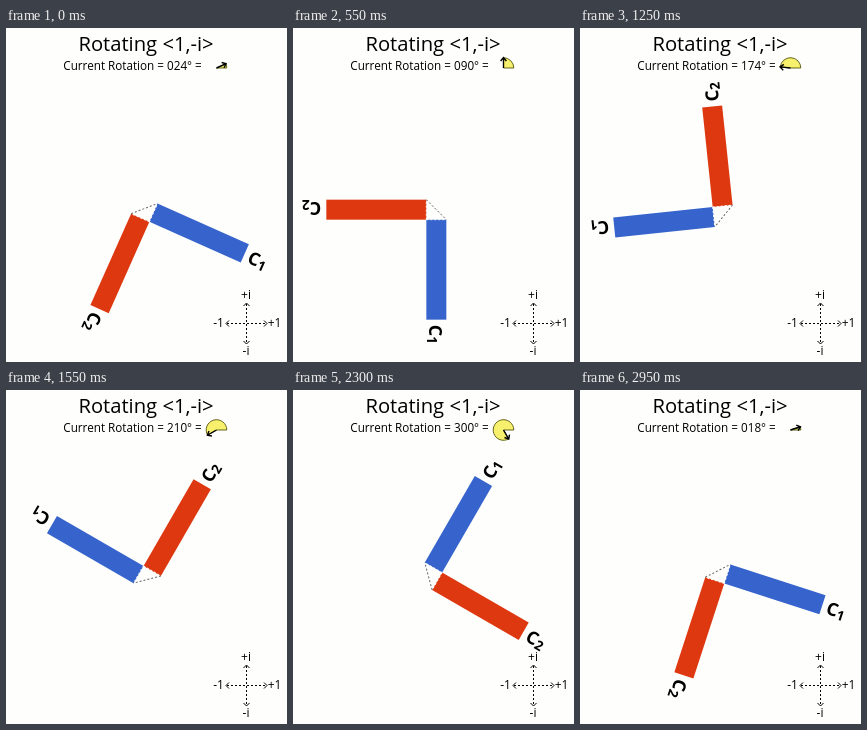
These frames come from a looping animation (281 px wide and 334 px high, 3000 ms). An HTML page:

```html
<!DOCTYPE html>
<html lang="en">
<head>
<meta charset="utf-8">
<title>Rotating</title>
<style>
  html, body { margin: 0; width: 100%; height: 100%; overflow: hidden; background: #fefefd; }
  svg { display: block; width: 281px; height: 334px; }
  text { font-family: "Open Sans", "Noto Sans", sans-serif; font-size: 12px; fill: #000; white-space: pre; }
  .mid { text-anchor: middle; }
  .title { font-size: 20.2px; }
  .status { font-size: 11.7px; }
  .label { font-size: 18px; font-weight: 700; }
  .sub { font-size: 13.5px; }
  .line { fill: none; stroke: #000; }
  .dots { stroke-dasharray: 2 2; }
</style>
</head>
<body>
<svg viewBox="0 0 281 334">
  <text class="title mid" x="140" y="23">Rotating &lt;1,-i&gt;</text>
  <text class="status" id="status" x="57.3" y="42"></text>

  <path id="wedge" fill="#f6f06c" stroke="#55550c" stroke-width=".9"/>
  <g id="needle" class="line" stroke-width="1.4">
    <path d="M0 0H10.5M7 -2.9L10.5 0L7 2.9"/>
  </g>

  <!-- The origin is the corner shared by both bars -->
  <g id="bars">
    <rect y="-20" width="100" height="20" fill="#3664cc"/>
    <rect x="-20" width="20" height="100" fill="#de3810"/>
    <path class="line dots" d="M0 0L-20 0M0 0L0 -20" style="stroke:#fefefd"/>
    <path class="line dots" d="M-20 0L0 -20" style="stroke:#666"/>
    <g transform="translate(105 -10)">
      <text class="label" y="7.5">C<tspan class="sub" dy="2">1</tspan></text>
    </g>
    <g transform="translate(-10 105) rotate(90)">
      <text class="label" y="7.5">C<tspan class="sub" dy="2">2</tspan></text>
    </g>
  </g>

  <g transform="translate(240 295)">
    <path class="line dots" d="M-19 .5H20M.5 -19V20"/>
    <path class="line" d="M-17 -2.5L-20 .5L-17 3.5M18 -2.5L21 .5L18 3.5M-2.5 -17L.5 -20L3.5 -17M-2.5 18L.5 21L3.5 18"/>
    <text class="mid" x="0" y="-24">+i</text>
    <text class="mid" x="0" y="32">-i</text>
    <text class="mid" x="-27.5" y="4">-1</text>
    <text class="mid" x="28.5" y="4">+1</text>
  </g>
</svg>
<script>
  const $ = id => document.getElementById(id);
  const STEP = 50, STEPS = 60, START = 24;
  const dial = { x: 210.5, y: 40, r: 10.3 };
  const corner = 20 / 3; // pivot is the centroid of the gap triangle

  function draw(angle) {
    const rad = angle * Math.PI / 180;
    const { x, y, r } = dial;
    const endX = x + r * Math.cos(rad), endY = y - r * Math.sin(rad);
    $("status").textContent = `Current Rotation = ${String(angle).padStart(3, "0")}° =`;
    $("wedge").setAttribute("d", angle
      ? `M${x} ${y}H${x + r}A${r} ${r} 0 ${angle > 180 ? 1 : 0} 0 ${endX} ${endY}Z`
      : "");
    $("needle").setAttribute("transform", `translate(${x} ${y}) rotate(${-angle})`);
    $("bars").setAttribute("transform",
      `translate(140 185) rotate(${angle}) translate(${corner} ${corner})`);
  }

  const t0 = performance.now();
  function tick() {
    const step = Math.floor((performance.now() - t0) / STEP) % STEPS;
    draw((START + step * 360 / STEPS) % 360);
    requestAnimationFrame(tick);
  }
  tick();
</script>
</body>
</html>
```
